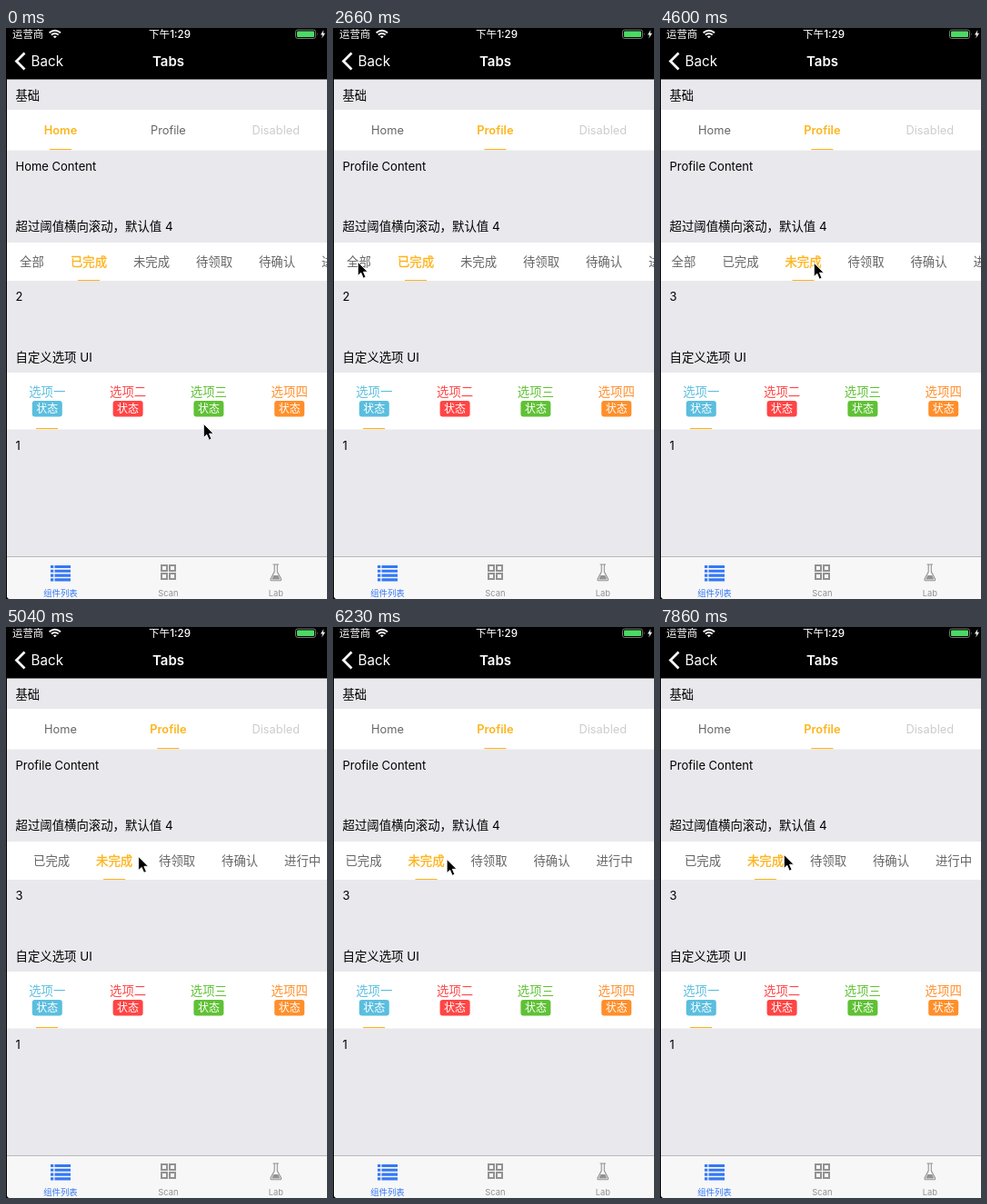
Write an HTML page that moves like this. It is 353 by 628 pixels and loops after 8000 ms.

```html
<!DOCTYPE html>
<html lang="zh-CN">
<head>
<meta charset="utf-8">
<title>Tabs</title>
<style>
  html, body { margin: 0; width: 100%; height: 100%; overflow: hidden; background: #000; }
  svg { display: block; width: 100vw; height: 100vh; }
  text { font-family: Inter, "Noto Sans CJK SC", "Noto Sans CJK", sans-serif; white-space: pre; }
</style>
</head>
<body>
<svg id="stage" viewBox="0 0 353 628">
  <path d="M1 56.5H353V628H5Q1 628 1 624Z" fill="#e9e8ed"/>
  <path d="M1 90H353V134.5H1ZM1 236H353V278H1ZM1 379H353V441.5H1Z" fill="#fff"/>
  <path d="M1 581H353V628H5Q1 628 1 624Z" fill="#f7f7f7"/>
  <path d="M1 581.5H353" stroke="#b9b9bd"/>

  <!-- status and navigation bars -->
  <g fill="none" stroke="#fff" stroke-width="1.9">
    <path d="M47.6 5.3Q53.8 .3 60 5.3M49.9 7.6Q53.8 4.5 57.7 7.6"/>
    <path d="M20.5 27.5L11.5 36.5L20.5 45.5" stroke-width="2.8"/>
  </g>
  <path d="M51.8 9.3Q53.8 7.8 55.8 9.3L53.8 11.3Z" fill="#fff"/>
  <rect x="318.5" y="2" width="22" height="9.5" rx="2.3" fill="none" stroke="#777"/>
  <rect x="320" y="3.5" width="19" height="6.5" rx="1" fill="#4cd964"/>
  <path d="M342 5.2Q343.5 6.7 342 8.2Z" fill="#777"/>
  <path d="M349.5 2L346 7.4H348.2L347.2 11.4L351 5.8H348.6Z" fill="#fff"/>

  <!-- bottom bar icons -->
  <path d="M49 592.5H71M49 597.3H71M49 602.1H71M49 606.9H71" stroke="#3478f6" stroke-width="3.1" stroke-dasharray="3.3 1.2 17.5 99"/>
  <path d="M171 591H177V597H171ZM180 591H186V597H180ZM171 600H177V606H171ZM180 600H186V606H180Z" fill="none" stroke="#929292" stroke-width="2"/>
  <path d="M293.5 590H300M295.2 590V598L291 606Q290.6 607.8 292.3 607.8H301.2Q302.9 607.8 302.5 606L298.3 598V590" fill="none" stroke="#929292" stroke-width="1.1"/>
  <path d="M294.3 602H299.2L301.3 606.5H292.2Z" fill="#929292"/>

  <g id="labels"></g>
  <g id="basic"></g>
  <clipPath id="stripClip"><rect x="1" y="236" width="352" height="42"/></clipPath>
  <g clip-path="url(#stripClip)"><g id="strip"></g></g>
  <g id="custom"></g>
  <path id="cursor" d="M.3 -.7V14.5L3.8 11.3L6.3 17.2L9 16L6.5 10.2H11.2Z" stroke="#fff" stroke-width=".9"/>
</svg>
<script>
const $ = id => document.getElementById(id);
const ACTIVE = '#fdb41c', IDLE = '#666';

function add(parent, tag, attrs, content = '') {
  const el = document.createElementNS('http://www.w3.org/2000/svg', tag);
  for (const key in attrs) el.setAttribute(key, attrs[key]);
  el.textContent = content;
  return parent.appendChild(el);
}

function label(parent, content, x, y, size, fill = '#000', anchor = 'start', weight = 400) {
  return add(parent, 'text', { x, y, fill, 'font-size': size, 'text-anchor': anchor, 'font-weight': weight }, content);
}

const underline = (parent, y) =>
  add(parent, 'rect', { x: 33, y, width: 24, height: 1.1, fill: ACTIVE });

const labels = $('labels');
label(labels, '运营商', 7, 11, 11.4, '#fff');
label(labels, '下午1:29', 180, 11, 11.6, '#fff', 'middle', 500);
label(labels, 'Back', 27.5, 42.3, 15.2, '#fff');
label(labels, 'Tabs', 178.5, 42.3, 15, '#fff', 'middle', 600);
label(labels, '基础', 10.5, 79, 13.3);
label(labels, '超过阈值横向滚动，默认值 4', 10.5, 223, 13.4);
label(labels, '自定义选项 UI', 10.5, 367, 13.4);
label(labels, '1', 10.5, 464, 13);
['组件列表', 'Scan', 'Lab'].forEach((name, i) =>
  label(labels, name, 60 + 118.4 * i, 625, 9.4, i ? '#929292' : '#3478f6', 'middle'));
const basicContent = label(labels, '', 10.5, 157, 13);
const stripContent = label(labels, '', 10.5, 300, 13);

const basicCenter = i => 60 + 118.4 * i;
const basicNames = ['Home', 'Profile', 'Disabled'];
const basicTabs = basicNames.map((name, i) =>
  label($('basic'), name, basicCenter(i), 117, 12.8, i === 2 ? '#ccc' : IDLE, 'middle'));
const basicLine = underline($('basic'), 133);

const stripCenter = i => i ? 22 + 69 * i : 28.5;
const stripTabs = ['全部', '已完成', '未完成', '待领取', '待确认', '进行中'].map((name, i) =>
  label($('strip'), name, stripCenter(i), 262, 13.4, IDLE, 'middle'));
const stripLine = underline($('strip'), 277);

['#5bbede', '#ff4545', '#5fc135', '#ff8f2b'].forEach((color, i) => {
  const x = 45.3 + 88.8 * i;
  label($('custom'), '选项' + '一二三四'[i], x, 405, 13.4, color, 'middle');
  add($('custom'), 'rect', { x: x - 16.5, y: 410, width: 33, height: 17.5, rx: 3, fill: color });
  label($('custom'), '状态', x, 423, 12, '#fff', 'middle');
});
underline($('custom'), 440);

// The screen refreshes in ticks; a tapped tab responds TAP_DELAY after the pointer arrives.
const LOOP = 8000, TICKS = 54, TICK = LOOP / TICKS, TAP_DELAY = 2;
const initial = { x: 217, y: 436, scroll: 0, basic: 0, strip: 1 };
const moves = [
  { leave: 3, arrive: 8, x: 191, y: 102, basic: 1 },
  { leave: 11, arrive: 14, x: 86, y: 247 },
  { leave: 15, arrive: 18, x: 27, y: 258, strip: 0 },
  { leave: 21, arrive: 23, x: 94, y: 258, strip: 1 },
  { leave: 25, arrive: 28, x: 169, y: 259, strip: 2, scroll: 2.5 },
  { leave: 31, arrive: 38, x: 109, y: 244, scroll: 100 },
  { leave: 38, arrive: 47, x: 147, y: 273, scroll: -2 },
  { leave: 47, arrive: 53, x: 136, y: 251, scroll: 44 }
];

const smooth = p => p * p * (3 - 2 * p);

function stateAt(tick) {
  const state = { ...initial };
  for (const move of moves) {
    if (tick <= move.leave) break;
    const p = smooth(Math.min(1, (tick - move.leave) / (move.arrive - move.leave)));
    for (const key of ['x', 'y', 'scroll']) state[key] += ((move[key] ?? state[key]) - state[key]) * p;
    if (tick >= move.arrive + TAP_DELAY) {
      state.basic = move.basic ?? state.basic;
      state.strip = move.strip ?? state.strip;
    }
  }
  return state;
}

function paint(tab, on, bold) {
  tab.setAttribute('fill', on ? ACTIVE : IDLE);
  for (const key in bold) tab.setAttribute(key, on ? bold[key] : 'inherit');
}

function draw(now) {
  const tick = Math.floor((now % LOOP + 8) / TICK) % TICKS;
  const { x, y, scroll, basic, strip } = stateAt(tick);
  basicTabs.slice(0, 2).forEach((tab, i) => paint(tab, i === basic, { 'font-weight': 600 }));
  // A hairline stroke gives the Chinese labels a medium weight.
  stripTabs.forEach((tab, i) => paint(tab, i === strip, { stroke: ACTIVE, 'stroke-width': .35 }));
  basicLine.setAttribute('x', basicCenter(basic) - 12);
  stripLine.setAttribute('x', stripCenter(strip) - 12);
  basicContent.textContent = basicNames[basic] + ' Content';
  stripContent.textContent = strip + 1;
  $('strip').setAttribute('transform', `translate(${-scroll})`);
  $('cursor').setAttribute('transform', `translate(${x},${y})`);
}

const start = performance.now();
function loop() {
  draw(performance.now() - start);
  requestAnimationFrame(loop);
}
loop();
</script>
</body>
</html>
```
